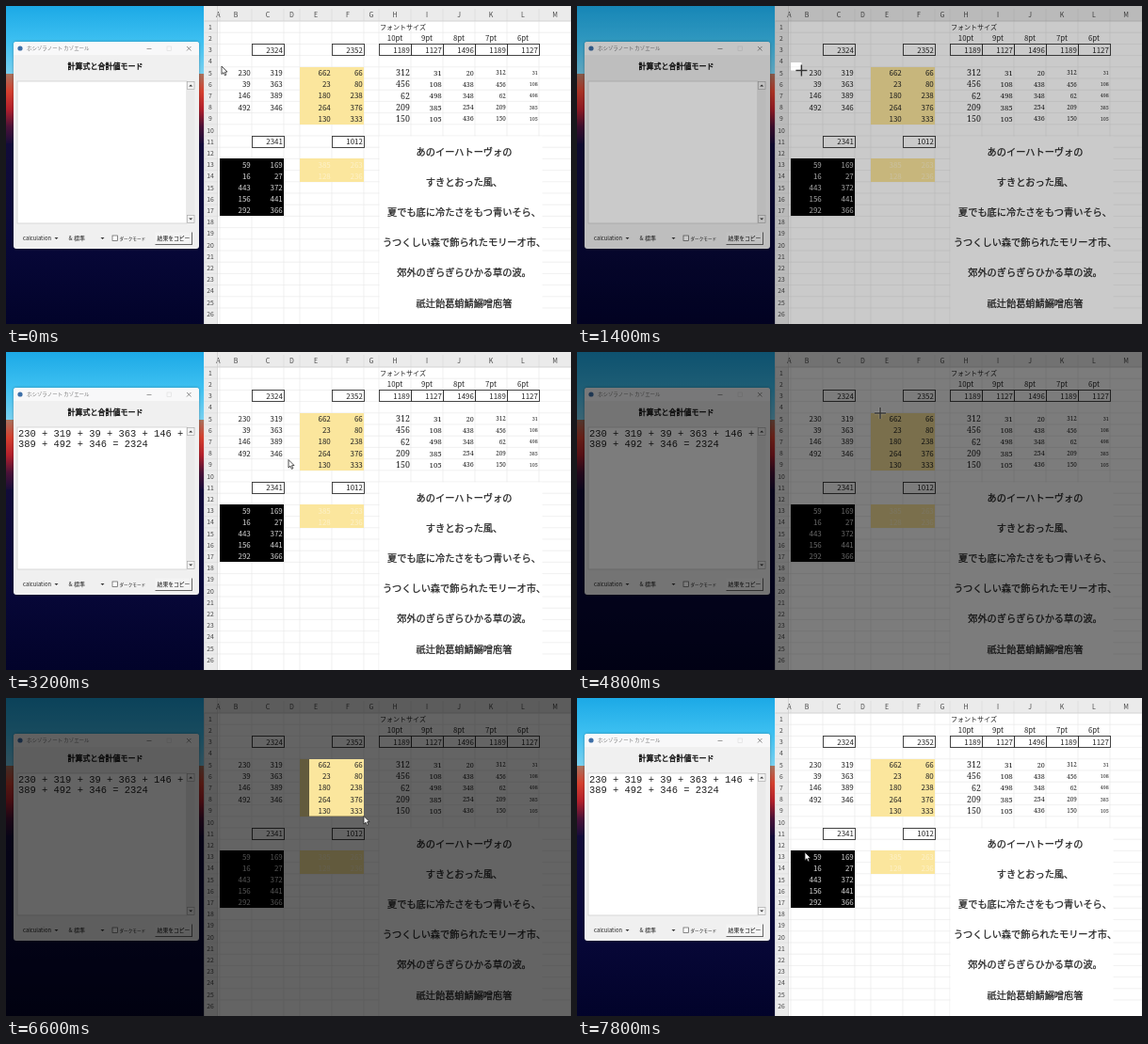
These frames come from a looping animation (600x338 px, 8 s). An HTML page with a canvas:

```html
<!DOCTYPE html>
<html lang="ja">
<head>
<meta charset="utf-8">
<title>計算式と合計値モード</title>
<style>
  html, body { margin: 0; width: 100%; height: 100%; overflow: hidden; background: #fff; }
  canvas { display: block; width: 100vw; height: 100vh; }
</style>
</head>
<body>
<canvas id="stage"></canvas>
<script>
const W = 600, H = 338, LOOP = 8000, STEP = 200;
const SHEET = 210.5, ROW = 12.2, HEAD = 16;
const SANS = '"Noto Sans CJK JP", "Noto Sans CJK", "Noto Sans", sans-serif';
const SERIF = '"Noto Serif", "Liberation Serif", serif';
const MONO = '"Liberation Mono", monospace';
const YELLOW = '#fbe69d';
const COLUMNS = [...'ABCDEFGHIJKLM'];
const POEM = ['あのイーハトーヴォの', 'すきとおった風、', '夏でも底に冷たさをもつ青いそら、',
  'うつくしい森で飾られたモリーオ市、', '郊外のぎらぎらひかる草の波。', '祇辻飴葛蛸鯖鰯噌庖箸'];

const canvas = document.getElementById('stage');
const ctx = canvas.getContext('2d');
const ratio = Math.max(1, window.devicePixelRatio || 1);
canvas.width = W * ratio;
canvas.height = H * ratio;

const ARROW = new Path2D('M0 0V8.5L2 6.7L3.4 9.8L4.8 9.2L3.5 6.2L6 6Z');

// Two screen selections, dragged from one corner to the other
const snips = [
  { start: 600, end: 2600, leave: 3200, from: { x: 227, y: 60 }, to: { x: 300, y: 114.5 }, dim: .22 },
  { start: 4000, end: 7000, leave: 7000, from: { x: 322, y: 65 }, to: { x: 380, y: 125.5 }, dim: .61 }
];
const AIM = .1, PRESS = .3, RELEASE = .7;
const moment = (snip, part) => snip.start + (snip.end - snip.start) * part;
const route = [
  { t: 0, x: 229, y: 64 },
  ...snips.flatMap(s => [
    { t: moment(s, AIM), ...s.from }, { t: moment(s, PRESS), ...s.from },
    { t: moment(s, RELEASE), ...s.to }, { t: s.leave, ...s.to }
  ]),
  { t: 7800, x: 242, y: 164 }
];

const clamp = v => Math.min(1, Math.max(0, v));
const ease = p => p * p * (3 - 2 * p);
const mix = (a, b, p) => a + (b - a) * p;

function cursorAt(t) {
  const next = route.findIndex(k => k.t > t);
  if (next < 0) return route[route.length - 1];
  const a = route[next - 1], b = route[next];
  const p = ease((t - a.t) / (b.t - a.t));
  return { x: mix(a.x, b.x, p), y: mix(a.y, b.y, p) };
}

const widthOf = c => ({ A: 3, D: 17, G: 16 })[c] || 34;
const left = c => COLUMNS.slice(0, COLUMNS.indexOf(c)).reduce((x, k) => x + widthOf(k), 224);
const right = c => left(c) + widthOf(c);
const middle = c => left(c) + widthOf(c) / 2;
const rowTop = r => HEAD + (r - 1) * ROW;
const rowMid = r => rowTop(r) + 6.3;

function rect(x, y, w, h, color) {
  ctx.fillStyle = color;
  ctx.fillRect(x, y, w, h);
}

function frame(x, y, w, h, color, width = 1) {
  ctx.strokeStyle = color;
  ctx.lineWidth = width;
  ctx.strokeRect(x, y, w, h);
}

function line(x0, y0, x1, y1, color, width = 1) {
  ctx.strokeStyle = color;
  ctx.lineWidth = width;
  ctx.beginPath();
  ctx.moveTo(x0, y0);
  ctx.lineTo(x1, y1);
  ctx.stroke();
}

function rounded(x, y, w, h, r, color) {
  ctx.fillStyle = color;
  ctx.beginPath();
  ctx.roundRect(x, y, w, h, r);
  ctx.fill();
}

function fade(y0, y1, ...colors) {
  const g = ctx.createLinearGradient(0, y0, 0, y1);
  colors.forEach((c, i) => g.addColorStop(i / (colors.length - 1), c));
  return g;
}

function text(str, x, y, size, { color = '#222', align = 'left', font = SANS, weight = 400, extra = 0 } = {}) {
  ctx.font = `${weight} ${size}px ${font}`;
  ctx.textAlign = align;
  ctx.fillStyle = ctx.strokeStyle = color;
  ctx.fillText(str, x, y + size * .36);
  if (!extra) return;
  ctx.lineWidth = extra;
  ctx.strokeText(str, x, y + size * .36);
}

function drawDesktop() {
  rect(0, 0, SHEET, 75, fade(0, 75, '#1ca9e6', '#3dc0f1', '#7fd2f0'));
  rect(0, 72, SHEET, 75, fade(72, 147, '#a8745f', '#d5402f', '#b3202c', '#4a1238', '#160d3a'));
  rect(0, 146, SHEET, H, fade(146, H, '#120c3a', '#08083a', '#02032a'));
}

function triangle(x, y, s, up = false) {
  const h = up ? -s : s;
  ctx.fillStyle = '#333';
  ctx.beginPath();
  ctx.moveTo(x - s, y - h / 2);
  ctx.lineTo(x + s, y - h / 2);
  ctx.lineTo(x, y + h / 2);
  ctx.fill();
}

function scrollButton(y, up) {
  rect(192.5, y, 7.5, 8, '#f2f2f2');
  frame(192.5, y, 7.5, 8, '#a5a5a5', .6);
  triangle(196.2, y + 4, 2, up);
}

function drawWindow(hasResult) {
  ctx.save();
  ctx.shadowColor = 'rgba(0,0,0,.3)';
  ctx.shadowBlur = 3 * ratio;
  rounded(8, 38, 197, 220, 3, '#f0f0f0');
  ctx.restore();
  rounded(8, 38, 197, 14, [3, 3, 0, 0], '#f8f8f9');
  rounded(12.4, 42.4, 5.2, 5.2, 2.6, '#3d6fa8');
  text('ホシゾラノート カゾエール', 22, 45.3, 5.45, { color: '#777' });
  line(149.5, 45.5, 154.5, 45.5, '#777', .7);
  frame(171, 43, 4.5, 4.5, '#ddd', .6);
  line(192, 43, 196.5, 47.5, '#666', .7);
  line(196.5, 43, 192, 47.5, '#666', .7);
  text('計算式と合計値モード', 105.5, 64, 8, { align: 'center', color: '#111', extra: .35 });

  rect(12, 80, 180, 151, '#fff');
  frame(12, 80, 180, 151, '#d0d0d0', .8);
  rect(192, 80, 8.5, 151, '#eaeaea');
  scrollButton(80.5, true);
  scrollButton(222.5, false);
  if (hasResult) {
    ['230 + 319 + 39 + 363 + 146 +', '389 + 492 + 346 = 2324']
      .forEach((s, i) => text(s, 13, 86 + i * 11, 10.45, { font: MONO }));
  }

  text('calculation', 18, 247, 5.8);
  triangle(53.5, 247, 2);
  text('& 標準', 66.5, 247, 6);
  triangle(102.5, 247, 2);
  rect(113, 244, 5.5, 5.5, '#fff');
  frame(113, 244, 5.5, 5.5, '#555', .7);
  text('ダークモード', 120.5, 247, 4.6);
  rect(158.5, 240.5, 39, 13, '#f4f4f4');
  line(158.5, 253.5, 198, 253.5, '#666');
  line(197.5, 240.5, 197.5, 253.5, '#666');
  text('結果をコピー', 178, 247, 5.8, { align: 'center', color: '#111' });
}

function fillCells(c0, r0, c1, r1, color) {
  const top = Math.round(rowTop(r0));
  rect(left(c0), top, right(c1) - left(c0), Math.round(rowTop(r1 + 1)) - top, color);
}

function number(col, row, value, size, opts) {
  text(value, right(col) - 1.2, rowMid(row), size, { align: 'right', ...opts });
}

// Writes lines of cells; their sum stands boxed two rows above the last column
function block(col, row, cells, size = 8, opts = {}) {
  const first = COLUMNS.indexOf(col);
  const lines = cells.split(' / ').map(s => s.split(' '));
  lines.forEach((values, i) =>
    values.forEach((v, k) => number(COLUMNS[first + k], row + i, v, size, opts)));
  const last = COLUMNS[first + lines[0].length - 1];
  const sum = lines.flat().reduce((a, v) => a + Number(v), 0);
  frame(left(last) + .5, Math.round(rowTop(row - 2)) + .5, widthOf(last), 12, '#333', .9);
  number(last, row - 2, sum, 7.9);
}

function drawGrid() {
  rect(SHEET, 0, W, H, '#fff');
  rect(SHEET, 0, W, HEAD, '#ebebeb');
  rect(SHEET, 0, 224.5 - SHEET, H, '#ebebeb');
  for (const c of COLUMNS) {
    line(right(c), HEAD, right(c), H, '#e6e6e6', .6);
    line(right(c), 3, right(c), HEAD, '#d0d0d0', .5);
    text(c, middle(c), 9.6, 7, { align: 'center', color: '#444' });
  }
  for (let r = 1; r <= 26; r++) {
    line(224, rowTop(r), W, rowTop(r), '#e6e6e6', .6);
    line(SHEET, rowTop(r), 224, rowTop(r), '#d6d6d6', .5);
    text(r, 217, rowMid(r), 6.8, { align: 'center', color: '#444' });
  }
  line(SHEET, HEAD, W, HEAD, '#c8c8c8', .6);
  line(224.5, 0, 224.5, H, '#c8c8c8', .6);
}

function drawSheet() {
  drawGrid();
  fillCells('E', 5, 'F', 9, YELLOW);
  fillCells('E', 13, 'F', 14, YELLOW);
  fillCells('B', 13, 'C', 17, '#000');
  rect(396.5, 138.5, 173, 200, '#fff');

  block('B', 5, '230 319 / 39 363 / 146 389 / 492 346');
  block('E', 5, '662 66 / 23 80 / 180 238 / 264 376 / 130 333');
  block('B', 13, '59 169 / 16 27 / 443 372 / 156 441 / 292 366', 8, { color: '#d4d4d4' });
  block('E', 13, '385 263 / 128 236', 8, { color: '#fdf1c8' });

  text('フォントサイズ', 397, rowMid(1), 7);
  const wide = '312 / 456 / 62 / 209 / 150', low = '31 / 108 / 498 / 385 / 105';
  [wide, low, '20 / 438 / 348 / 254 / 436', wide, low].forEach((cells, k) => {
    const col = 'HIJKL'[k];
    text(10 - k + 'pt', middle(col), rowMid(2), 7.8, { align: 'center' });
    block(col, 5, cells, 8.8 - k * .85, { font: SERIF });
  });
  POEM.forEach((s, i) => text(s, 486.5, 155 + i * 32.2, 10.2, { align: 'center', extra: .25 }));
}

function drawOverlay(snip, t) {
  const { from, to, start, end } = snip;
  const part = (t - start) / (end - start);
  const p = ease(clamp((part - PRESS) / (RELEASE - PRESS)));
  ctx.beginPath();
  ctx.rect(0, 0, W, H);
  if (p > 0) ctx.rect(from.x, from.y, (to.x - from.x) * p, (to.y - from.y) * p);
  ctx.fillStyle = `rgba(0,0,0,${snip.dim * (1 - Math.exp(-7 * part))})`;
  ctx.fill('evenodd');
}

function drawCross({ x, y }) {
  for (const [color, width] of [['rgba(255,255,255,.3)', 2.6], ['#333', 1.5]]) {
    line(x - 6, y, x + 6, y, color, width);
    line(x, y - 6, x, y + 6, color, width);
  }
}

function drawArrow({ x, y }) {
  ctx.save();
  ctx.translate(x, y);
  ctx.fillStyle = '#fff';
  ctx.fill(ARROW);
  ctx.strokeStyle = '#222';
  ctx.lineWidth = .8;
  ctx.stroke(ARROW);
  ctx.restore();
}

function draw(t) {
  ctx.setTransform(ratio, 0, 0, ratio, 0, 0);
  drawDesktop();
  drawWindow(t >= 3000);
  drawSheet();
  const snip = snips.find(s => t >= s.start && t < s.end);
  if (snip) drawOverlay(snip, t);
  const aiming = snip && t >= moment(snip, AIM) && t < moment(snip, RELEASE);
  (aiming ? drawCross : drawArrow)(cursorAt(t));
}

function tick(now) {
  draw(Math.floor((now % LOOP) / STEP) * STEP);
  requestAnimationFrame(tick);
}
draw(0);
requestAnimationFrame(tick);
</script>
</body>
</html>
```
